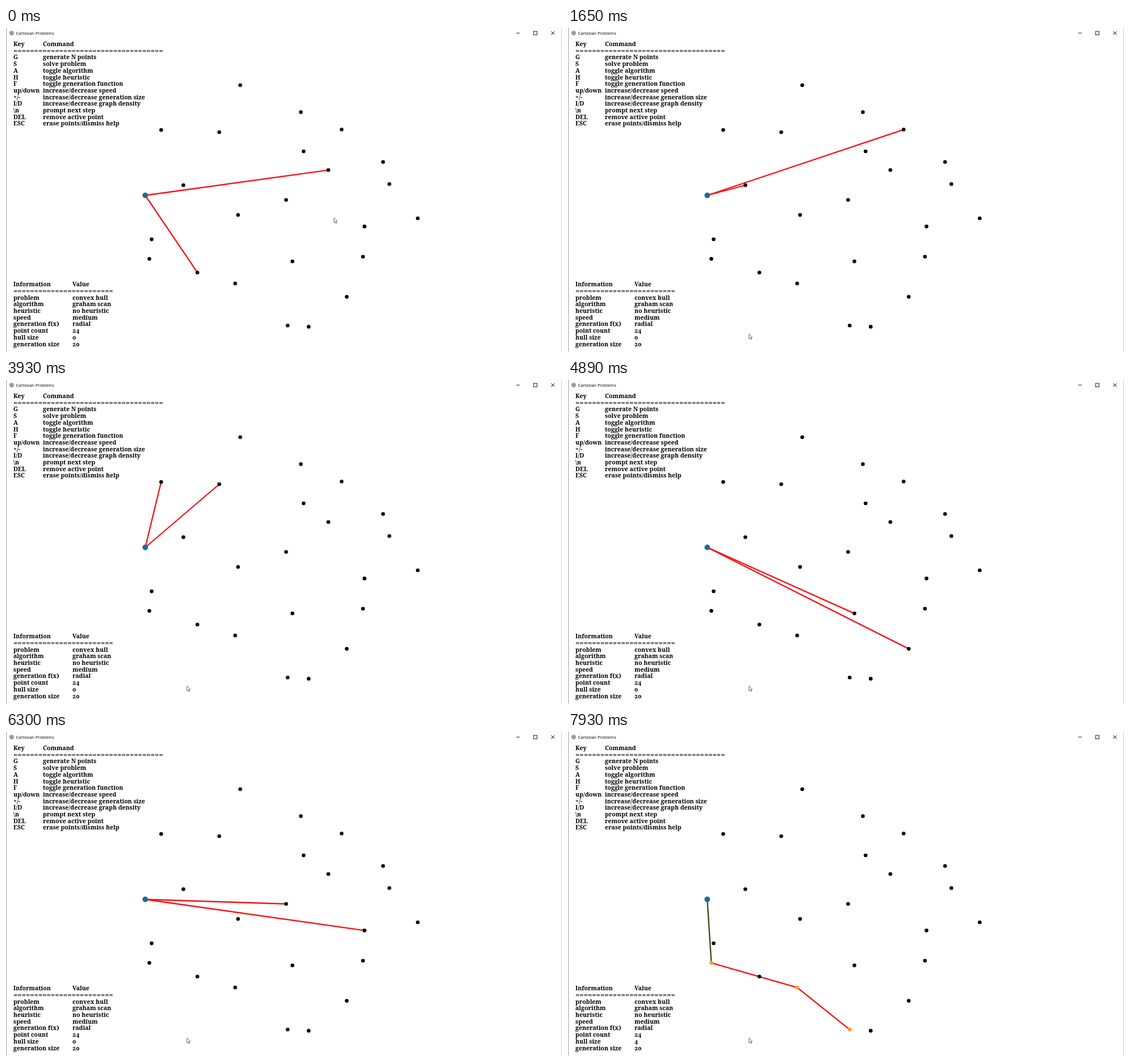
An HTML page with a canvas that plays this animation: 979x572 px, repeating every 8 s.

```html
<!DOCTYPE html>
<html lang="en">
<head>
<meta charset="utf-8">
<title>Cartesian Problems</title>
<style>
html, body { margin: 0; width: 100%; height: 100%; overflow: hidden; background: #fff; }
canvas, svg { position: absolute; left: 0; top: 0; width: 979px; height: 572px; }
text { fill: #000; font: bold 10.55px "Noto Serif", "Liberation Serif", serif; font-feature-settings: "onum"; white-space: pre; }
.rule { font-size: 13.1px; }
.title { font: 7.4px "Open Sans", "Noto Sans", sans-serif; }
</style>
</head>
<body>
<canvas width="979" height="572"></canvas>
<svg viewBox="0 0 979 572"></svg>
<script>
const W = 979, H = 572, LOOP = 8000, PITCH = 11.7;
const RED = '#fa1014', LINE = 2.3;
const canvas = document.querySelector('canvas');
const svg = document.querySelector('svg');
const ctx = canvas.getContext('2d');
const ratio = window.devicePixelRatio || 1;
canvas.width = W * ratio;
canvas.height = H * ratio;

const pivot = [245.2, 295.5];
const points = {
  a: [273.2, 180], b: [412.4, 101], c: [375.5, 184], d: [519.2, 148.6],
  e: [591, 179.3], f: [524, 217.7], g: [312.3, 277.5], h: [567.6, 250.8],
  i: [663.9, 236.5], j: [675, 275.5], k: [493.2, 303.5], l: [725, 336],
  m: [631.2, 350.4], n: [408.6, 330.1], o: [628.5, 403.7], p: [504.3, 412.1],
  q: [600, 474.6], r: [533, 527.4], s: [496, 525.3], t: [403.5, 451.1],
  u: [337, 431.7], v: [256.4, 373.1], w: [252.4, 407.6]
};

// Each word: the point being inserted, then those it is compared with.
const inserts = 'hucnf jnhl gnfh bnfc egc knhl qlous tlqu vlqtu algecb ' +
  'rnqs pnsoq wltv dlbc ilgjhf mkspol nlspom';
const compares = inserts.split(' ').flatMap(w => [...w.slice(1)].map(x => w[0] + x));
const hulls = ['w', 'wv', 'wu', 'wt', 'wts'];

function startOf(i) {
  if (i < 2) return 120 * i;
  if (i < 52) return Math.min(Math.max(370, 90 + 120 * i), 6180);
  return Math.min(60 + 120 * i, 7930);
}
const starts = Array.from({ length: compares.length + hulls.length }, (_, i) => startOf(i));

const mouse = [[577.5, 335], [638, 390], [748, 505], [732, 563], [610, 566], [485, 559], [385, 548], [318.7, 540]];

function addText(x, y, str, cls) {
  const el = document.createElementNS('http://www.w3.org/2000/svg', 'text');
  el.setAttribute('x', x);
  el.setAttribute('y', y);
  if (cls) el.setAttribute('class', cls);
  el.textContent = str;
  svg.append(el);
  return el;
}

function addTable(y, col, ruleLength, rows) {
  return rows.map(([key, value], i) => {
    const row = y + PITCH * (i ? i + 1 : 0);
    addText(13, row, key);
    if (!i) addText(13, y + PITCH + 1, '='.repeat(ruleLength), 'rule');
    return addText(col, row, value);
  });
}

addText(17.5, 12, 'Cartesian Problems', 'title');
addTable(32, 65, 36, [
  ['Key', 'Command'],
  ['G', 'generate N points'],
  ['S', 'solve problem'],
  ['A', 'toggle algorithm'],
  ['H', 'toggle heuristic'],
  ['F', 'toggle generation function'],
  ['up/down', 'increase/decrease speed'],
  ['+/-', 'increase/decrease generation size'],
  ['I/D', 'increase/decrease graph density'],
  ['\\n', 'prompt next step'],
  ['DEL', 'remove active point'],
  ['ESC', 'erase points/dismiss help']
]);
const hullSize = addTable(456.2, 117, 24, [
  ['Information', 'Value'],
  ['problem', 'convex hull'],
  ['algorithm', 'graham scan'],
  ['heuristic', 'no heuristic'],
  ['speed', 'medium'],
  ['generation f(x)', 'radial'],
  ['point count', '24'],
  ['hull size', '0'],
  ['generation size', '20']
])[7];

function dot([x, y], r, color) {
  ctx.fillStyle = color;
  ctx.beginPath();
  ctx.arc(x, y, r, 0, 2 * Math.PI);
  ctx.fill();
}

function path(pts, color, width) {
  ctx.strokeStyle = color;
  ctx.lineWidth = width;
  ctx.beginPath();
  pts.forEach(([x, y]) => ctx.lineTo(x, y));
  ctx.stroke();
}

function drawWindow() {
  ctx.fillStyle = '#fff';
  ctx.fillRect(0, 0, W, H);
  ctx.fillStyle = '#a0a0a0';
  ctx.fillRect(0, 0, 1, H);
  ctx.fillStyle = '#c8c8c8';
  ctx.fillRect(W - 1, 0, 1, H);
  dot([10, 9], 4, '#8e9cab');
  path([[898.5, 9], [904.5, 9]], '#111', 1);
  ctx.strokeRect(929, 6, 6, 6);
  path([[960, 6], [966, 12]], '#111', 1);
  path([[966, 6], [960, 12]], '#111', 1);
}

function drawMouse([x, y]) {
  ctx.save();
  ctx.translate(x, y);
  ctx.beginPath();
  [[0, 0], [0, 8.7], [2, 6.9], [3.4, 10], [4.7, 9.4], [3.4, 6.4], [6, 6.2]].forEach(p => ctx.lineTo(...p));
  ctx.closePath();
  ctx.fillStyle = '#fff';
  ctx.fill();
  ctx.strokeStyle = '#444';
  ctx.lineWidth = .8;
  ctx.stroke();
  ctx.restore();
}

function draw(time) {
  const step = starts.findLastIndex(s => s <= time);
  const hull = hulls[step - compares.length] || '';
  ctx.setTransform(ratio, 0, 0, ratio, 0, 0);
  drawWindow();
  if (hull) {
    const chain = [...hull].map(id => points[id]);
    path(chain, RED, LINE);
    path([pivot, chain[0]], '#3d4516', LINE);
  } else {
    for (const id of compares[step]) path([pivot, points[id]], RED, LINE);
  }
  for (const id in points) dot(points[id], 3.3, hull.includes(id) ? '#f5a21c' : '#000');
  dot(pivot, 4.9, '#1b6d93');
  drawMouse(mouse[Math.min(step, mouse.length - 1)]);
  hullSize.textContent = hull ? hull.length + 1 : 0;
}

function tick() {
  draw(performance.now() % LOOP);
  requestAnimationFrame(tick);
}
tick();
</script>
</body>
</html>
```
